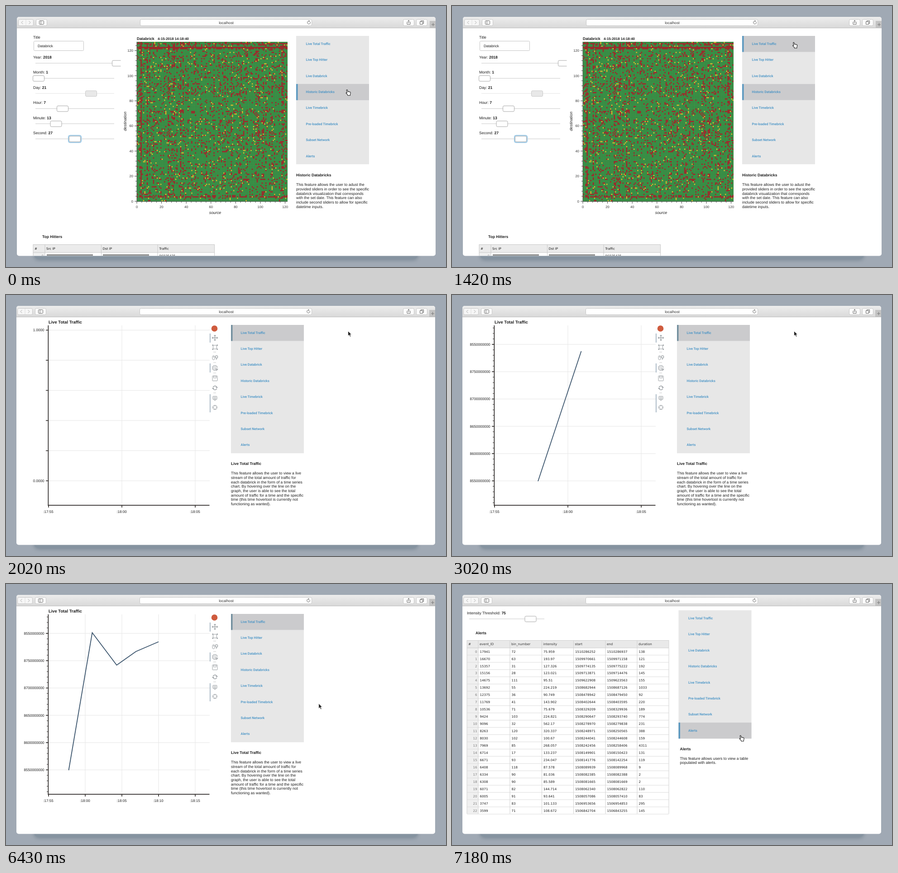
These frames come from a looping animation (972x576 px, 9.05 s). An HTML page with a canvas:

```html
<!DOCTYPE html>
<html lang="en">
<head>
<meta charset="utf-8">
<title>Traffic dashboard</title>
<style>
html, body { margin: 0; width: 100%; height: 100%; overflow: hidden; background: #a0a9b4; }
canvas, svg { position: absolute; left: 0; top: 0; width: 972px; height: 576px; }
text { white-space: pre; text-rendering: geometricPrecision; }
</style>
</head>
<body>
<canvas id="stage" width="972" height="576"></canvas>
<svg id="ink" viewBox="0 0 972 576">
  <clipPath id="page"><rect x="23" y="24" width="926" height="527"/></clipPath>
  <g id="words" clip-path="url(#page)"></g>
  <g id="arrow" stroke-linejoin="round">
    <path d="M0 0V11L2.6 8.7L4.5 12.8L6.5 11.9L4.7 7.9H8Z" fill="#222" stroke="#fff" stroke-width=".9"/>
  </g>
  <g id="hand" fill="#fff" stroke="#222" stroke-width="1.1" stroke-linejoin="round">
    <path d="M1.2 1.2C1 .2 3 -.2 3.3 1L4.1 4.6C4.4 3.8 5.7 3.9 6 4.9C6.6 4.2 7.8 4.5 8 5.4C8.8 4.9 10 5.4 10.1 6.6C10.2 8.6 9.8 9.8 9.3 11V13H4V11.7L.6 8.3C-.6 6.9 .9 6.1 2.4 7.5Z"/>
  </g>
</svg>
<script>
const LOOP = 9050;
const ctx = document.getElementById('stage').getContext('2d');
const $ = id => document.getElementById(id);
const SANS = '"Liberation Sans", Arial, sans-serif';
const WIDE = '"DejaVu Sans", Verdana, sans-serif';
const LINK = 'Roboto, sans-serif';
const ITEM = 35.4;
const ITEMS = ['Live Total Traffic', 'Live Top Hitter', 'Live Databrick', 'Historic Databricks',
  'Live Timebrick', 'Pre-loaded Timebrick', 'Subset Network', 'Alerts'];

// Text helpers
function node(name, parent, attrs) {
  const el = document.createElementNS('http://www.w3.org/2000/svg', name);
  for (const k in attrs) el.setAttribute(k, attrs[k]);
  return parent.appendChild(el);
}
const groups = {};
const group = name => groups[name] = node('g', $('words'), {});

function text(g, str, x, y, opt = {}) {
  const el = node('text', g, { x, y, 'font-family': SANS, 'font-size': 8.5, fill: '#1c1c1c', ...opt });
  el.textContent = str;
  return el;
}
const bold = (g, str, x, y, size = 8.5) => text(g, str, x, y, { 'font-size': size, 'font-weight': 'bold' });
const lines = (g, list, x, y) => list.forEach((s, i) => text(g, s, x, y + i * 9.67));
const wide = (g, str, x, y, opt = {}) => text(g, str, x, y, { 'font-family': WIDE, 'font-size': 7.1, ...opt });

function pair(g, label, value, x, y) {
  const el = text(g, label + ' ', x, y);
  node('tspan', el, { 'font-weight': 'bold' }).textContent = value;
}
function links(g, x, y) {
  ITEMS.forEach((s, i) => text(g, s, x + 21.5, y + i * ITEM + 19.7,
    { 'font-family': LINK, 'font-size': 7.4, 'font-weight': 500, fill: '#3f8fc4' }));
}

// Shape helpers
function rect(x, y, w, h, fill) {
  ctx.fillStyle = fill;
  ctx.fillRect(x, y, w, h);
}
function box(x, y, w, h, r, fill, stroke) {
  ctx.beginPath();
  ctx.roundRect(x, y, w, h, r);
  if (fill) { ctx.fillStyle = fill; ctx.fill(); }
  if (stroke) { ctx.strokeStyle = stroke; ctx.stroke(); }
}
function path(points, color, width = 1) {
  ctx.beginPath();
  points.forEach(([x, y]) => ctx.lineTo(x, y));
  ctx.strokeStyle = color;
  ctx.lineWidth = width;
  ctx.stroke();
  ctx.lineWidth = 1;
}
function arc(x, y, r, a, b, color, width = 1) {
  ctx.beginPath();
  ctx.arc(x, y, r, a, b);
  ctx.strokeStyle = color;
  ctx.lineWidth = width;
  ctx.stroke();
  ctx.lineWidth = 1;
}

function browser(dx) {
  rect(0, 0, 972, 576, '#a0a9b4');
  ctx.save();
  ctx.shadowColor = '#7b8996';
  ctx.shadowBlur = 9;
  ctx.shadowOffsetY = 3;
  box(62, 535, 848, 23, 10, '#8593a0');
  ctx.restore();

  const left = 23 + dx;
  box(left, 24, 925, 527.5, 5, '#fff');
  const bar = ctx.createLinearGradient(0, 24, 0, 48);
  bar.addColorStop(0, '#ededed');
  bar.addColorStop(1, '#d9d9d9');
  box(left, 24, 925, 24, [5, 5, 0, 0], bar);
  rect(left, 48, 925, 1, '#bcbcbc');

  const edge = '#c6c6c6', mark = '#6b6b6b', b = 26 + dx * 2;
  box(b - .5, 29.5, 33, 14, 3, '#f6f6f6', edge);
  path([[b + 16, 30], [b + 16, 43]], '#dedede');
  path([[b + 9.5, 33], [b + 6, 36.5], [b + 9.5, 40]], '#ababab');
  path([[b + 22.5, 33], [b + 26, 36.5], [b + 22.5, 40]], '#ababab');
  box(b + 38.5, 29.5, 24, 14, 3, '#fbfbfb', edge);
  box(b + 45.5, 32.5, 10, 8, 1, null, mark);
  path([[b + 49, 33], [b + 49, 40]], mark);
  box(295 + dx + .5, 29.5, 380 - dx, 14, 3, '#fff', edge);
  arc(668 + dx, 36.5, 3.3, -.4, 4.9, mark);
  path([[667.5 + dx, 31.6], [670 + dx, 33.3], [667.5 + dx, 35]], mark);
  box(877.5, 29.5, 24, 14, 3, '#fbfbfb', edge);
  path([[887.5, 35.5], [886, 35.5], [886, 40.5], [893, 40.5], [893, 35.5], [891.5, 35.5]], mark);
  path([[889.5, 38], [889.5, 31.5]], mark);
  path([[887.5, 33.5], [889.5, 31.5], [891.5, 33.5]], mark);
  box(906.5, 29.5, 24, 14, 3, '#fbfbfb', edge);
  box(916.5, 32.5, 6, 6, 0, null, mark);
  box(914.5, 34.5, 6, 6, 0, '#fbfbfb', mark);
  rect(935 + dx, 33, 13, 15, '#c3c3c3');
  path([[939 + dx, 41], [946 + dx, 41]], '#777');
  path([[942.5 + dx, 37.5], [942.5 + dx, 44.5]], '#777');
}

function menu(x, y, lit, edge = '#5b98bf', fill = '#cbcbcd') {
  rect(x, y, 161, ITEM * 8, '#e7e7e7');
  lit.forEach(i => {
    if (i < 0) return;
    rect(x, y + i * ITEM, 161, ITEM, fill);
    rect(x, y + i * ITEM, 3.5, ITEM, edge);
  });
}
function slider(x0, x1, y, handle, faded) {
  rect(x0, y - .5, x1 - x0, 1, faded ? '#e4e4e4' : '#c9c9c9');
  box(handle + .5, y - 6, 25, 12.5, 2.5, faded ? '#e8e8e8' : '#fff', faded ? '#c9c9c9' : '#a8a8a8');
}

// Heatmap
const CW = 333 / 122, RH = 352 / 127;
function makeHeat() {
  let seed = 20418;
  const rnd = () => (seed = (seed * 16807) % 2147483647) / 2147483647;
  const c = document.createElement('canvas');
  c.width = 333; c.height = 352;
  const h = c.getContext('2d');
  const cols = Array.from({ length: 122 }, () => rnd() ** 3 * .24);
  const rows = Array.from({ length: 127 }, () => rnd() ** 3 * .2);
  [8, 10, 25, 35, 62, 66, 71, 73, 86, 104, 117].forEach(i => cols[i] += .2);
  [37, 102].forEach(i => cols[i] += .32);
  cols[3] = .62;
  rows[125] = .5; rows[122] = 1; rows[121] = .55; rows[3] = .5;
  h.fillStyle = '#42a04f';
  h.fillRect(0, 0, 333, 352);
  for (let y = 0; y < 127; y++) for (let x = 0; x < 122; x++) {
    const p = y < 2 ? .04 : .035 + cols[x] + rows[y], r = rnd();
    if (r < p) h.fillStyle = '#c4202f';
    else if (r > .966) h.fillStyle = '#f0cf35';
    else continue;
    h.fillRect(x * CW, 352 - (y + 1) * RH, CW, RH);
  }
  h.fillStyle = 'rgba(25,70,35,.42)';
  for (let x = 0; x <= 122; x++) h.fillRect(x * CW - .35, 0, .7, 352);
  for (let y = 0; y <= 127; y++) h.fillRect(0, 352 - y * RH - .35, 333, .7);
  return c;
}
const heat = makeHeat();

const KNOBS = [['Year:', '2018', 234], ['Month:', '1', 59], ['Day:', '21', 175],
  ['Hour:', '7', 112], ['Minute:', '13', 97.5], ['Second:', '27', 139]];

function drawBricks(hover) {
  box(61.5, 77.5, 110, 21, 2, '#fff', '#c4c4c4');
  KNOBS.forEach(([, , x], i) => {
    const y = 126.2 + i * 33.4;
    ctx.save();
    ctx.beginPath();
    ctx.rect(50, y - 12, 203.5, 24);
    ctx.clip();
    if (i === 5) box(x - 1.5, y - 8, 29, 16.5, 4, '#b9dcf3', '#7fbbe3');
    slider(65, 239, y, x, i === 2);
    ctx.restore();
  });
  ctx.drawImage(heat, 289, 79);
  for (let v = 0; v <= 124; v += 4) {
    const big = v % 20 === 0 ? 5 : 3;
    rect(289 - big, 430.5 - v * RH, big, 1, '#444');
    if (v <= 120) rect(288.5 + v * CW, 431, 1, big, '#444');
  }
  rect(288.5, 79, 1, 353, '#555');
  rect(288.5, 431, 333.5, 1, '#555');
  menu(641, 66, [3, hover]);

  rect(60, 526, 401, 18, '#ebebeb');
  rect(60, 544, 26, 7, '#f0f0f0');
  rect(60, 526, 401, 1, '#c8c8c8');
  rect(60, 543.5, 401, 1, '#c8c8c8');
  [60, 86, 210.5, 335, 460.5].forEach(x => rect(x - .5, 526, 1, 25, '#c8c8c8'));
  rect(90, 548, 102, 3, '#8d8d8d');
  rect(214, 548, 102, 3, '#8d8d8d');
}

function writeBricks() {
  const g = group('bricks');
  text(g, 'Title', 60, 72);
  text(g, 'Databrick', 70, 91.3, { 'font-size': 8 });
  KNOBS.forEach(([a, b], i) => pair(g, a, b, 60, 116 + i * 33.4));
  bold(g, 'Databrick', 289, 75);
  bold(g, '4-15-2018 14:18:40', 335, 75, 7.8);
  const axis = { 'font-size': 7.6, 'text-anchor': 'middle', fill: '#333' };
  for (let v = 0; v <= 120; v += 20) {
    text(g, v, 289 + v * CW, 445.5, axis);
    text(g, v, 281, 433.7 - v * RH, { ...axis, 'text-anchor': 'end' });
  }
  const slant = { 'font-size': 8.8, 'font-style': 'italic', 'text-anchor': 'middle' };
  text(g, 'source', 462, 459, slant);
  text(g, 'destination', 0, 0, { ...slant, transform: 'translate(265.5 254.5) rotate(-90)' });
  links(g, 641, 66);
  bold(g, 'Historic Databricks', 641, 376);
  lines(g, ['This feature allows the user to adust the', 'provided sliders in order to see the specific',
    'databrick visualization that corresponds', 'with the set date. This feature can also',
    'include second sliders to allow for specific', 'datetime inputs.'], 641, 397.3);
  bold(g, 'Top Hitters', 80, 512);
  [['#', 63], ['Src IP', 89], ['Dst IP', 213.5], ['Traffic', 338.5]].forEach(([s, x]) => wide(g, s, x, 537.5));
  wide(g, '0', 83, 553.8, { 'text-anchor': 'end', fill: '#888' });
  wide(g, '96935435', 338.5, 553.8);
}

// Line chart: pixels per five seconds, then the data points
const STAGES = [
  { at: 2020, step: 162, pts: [] },
  { at: 3020, step: 162, pts: [[190, 411], [285.5, 124]] },
  { at: 4020, step: 130, pts: [[167, 411], [250, 108], [325, 181]] },
  { at: 5020, step: 108, pts: [[148, 411], [225, 107.5], [284.5, 181], [351, 148]] },
  { at: 6020, step: 81, pts: [[138.5, 411], [190.5, 107.5], [244.5, 179], [287, 149], [337, 127.5]] }
];
const ROWS = ['8550000000', '8750000000', '8700000000', '8650000000', '8600000000', '8550000000'];
const tickY = (i, empty) => empty ? 77.5 + i * 66.5 : 109 + i * 60.25;

function tools() {
  const c = '#9a9fa3', x = 461.5;
  [[85, 20], [151, 20], [219, 40]].forEach(([y, h]) => rect(450, y, 1.7, h, '#9fb0bf'));
  [126, 149, 172, 216].forEach(y => rect(458, y - .5, 6, 1, '#ccc'));
  ctx.beginPath();
  ctx.arc(460.5, 74, 6.8, 0, 7);
  ctx.fillStyle = '#cf5b3e';
  ctx.fill();
  path([[x - 5.5, 94.5], [x + 5.5, 94.5]], c, 1.3);
  path([[x, 89], [x, 100]], c, 1.3);
  for (let k = 0; k < 4; k++) {
    const a = k * Math.PI / 2, p = (r, d) => [x + r * Math.cos(a) - d * Math.sin(a), 94.5 + r * Math.sin(a) + d * Math.cos(a)];
    path([p(4, -2), p(6, 0), p(4, 2)], c, 1.2);
    rect(x + (k & 1 ? 4 : -6), 115 + (k & 2 ? 3.5 : -5.5), 2.5, 2.5, c);
  }
  box(x - 4, 111, 8, 8, 0, null, c);
  box(x - 5.5, 134, 5, 9, 2.5, null, c);
  path([[x - 3, 135], [x - 3, 138]], c);
  arc(x + 3.5, 136.5, 2.7, 0, 7, c, 1.2);
  path([[x + 4.5, 139], [x + 2.5, 143]], c, 1.2);
  arc(x, 161, 5.5, .9, 6.2, c, 1.2);
  arc(x, 161, 2.6, 0, 7, c);
  path([[x + 1, 163.5], [x + 6, 163.5], [x + 3.5, 167]], c, 1.3);
  box(x - 5.5, 178.5, 11, 11, 1, null, c);
  box(x - 3, 179, 6, 4, 0, null, c);
  arc(x, 205, 4.3, 3.4, 5.9, c, 1.5);
  arc(x, 205, 4.3, .3, 2.8, c, 1.5);
  path([[x + 2, 204], [x + 6, 204]], c, 1.8);
  path([[x - 6, 206], [x - 2, 206]], c, 1.8);
  box(x - 4.5, 223.5, 9, 7, 1, null, c);
  path([[x - 3, 226], [x + 3, 226]], c);
  path([[x - 3, 228.3], [x + 3, 228.3]], c);
  path([[x - 2, 231], [x, 233.5], [x + 2, 231]], c);
  arc(x, 248, 4.6, 0, 7, c, 1.2);
  [[0, -1], [0, 1], [1, 0], [-1, 0]].forEach(([a, b]) =>
    path([[x + a * 5, 248 + b * 5], [x + a * 2, 248 + b * 2]], c));
}

function drawChart(s, hover) {
  const ink = '#2e2a28', empty = !s.pts.length;
  for (let i = 0; i < 6; i++) {
    const y = tickY(i, empty);
    rect(94, y - .5, 356, 1, '#e6e6e6');
    rect(88, y - .7, 5, 1.5, ink);
  }
  if (!empty) for (let y = 72.8; y < 464; y += 12.05) rect(90, y - .5, 3, 1, ink);
  for (let x = 94; x < 450; x += s.step) {
    if (x > 94) rect(x - .5, 67, 1, 396, '#e6e6e6');
    rect(x - .8, 464, 1.6, 5, ink);
  }
  rect(92.5, 67, 1.7, 398, ink);
  rect(92.5, 463.2, 357, 1.7, ink);
  if (!empty) path(s.pts, '#3d566e', 1.8);
  tools();
  menu(497, 66, [0, hover], '#73909f');
}

function writeChart() {
  const g = group('live');
  bold(g, 'Live Total Traffic', 94, 63, 9.4);
  links(g, 497, 65.8);
  bold(g, 'Live Total Traffic', 497, 375);
  lines(g, ['This feature allows the user to view a live', 'stream of the total amount of traffic for',
    'each databrick in the form of a time series', 'chart. By hovering over the line on the',
    'graph, the user is able to see the total', 'amount of traffic for a time and the specific',
    'time (this time hovertool is currently not', 'functioning as wanted).'], 497, 396.4);
  STAGES.forEach((s, n) => {
    const t = group('axis' + n), empty = !s.pts.length;
    const end = { 'font-size': 8.1, 'text-anchor': 'end' };
    if (empty) [['1.0000', 0], ['0.0000', 5]].forEach(([v, i]) => text(t, v, 84.5, tickY(i, true) + 2.9, end));
    else ROWS.forEach((v, i) => text(t, v, 84.5, tickY(i) + 2.9, end));
    ['17:55', '18:00', '18:05', '18:10', '18:15'].forEach((v, i) => {
      const x = 94 + i * s.step;
      if (x < 450) text(t, ':' + v, x - .5, 480.5, { 'font-size': 8, 'text-anchor': 'middle' });
    });
  });
}

// Alerts page
const COLS = [33, 58, 128, 198.5, 268.5, 339, 409, 479];
const ROW = 15.95;
const ALERTS = `17941 72 75.959 1510286252 1510286937 138
16670 63 193.97 1509970661 1509971158 121
15357 31 127.326 1509774135 1509775222 192
15156 28 123.021 1509713871 1509714476 145
14675 111 95.51 1509622908 1509623563 155
13692 55 224.219 1508682944 1508687126 1033
12375 36 90.749 1508478942 1508479450 92
11769 41 143.902 1508402644 1508403595 220
10536 71 75.679 1508329209 1508329936 189
9424 103 224.821 1508290647 1508293740 774
9096 32 562.17 1508278970 1508279838 231
8263 120 320.337 1508248971 1508250565 388
8030 102 100.67 1508244041 1508244608 159
7969 85 268.057 1508242456 1508258406 4311
6714 17 133.237 1508149901 1508150423 131
6671 93 234.047 1508141776 1508142254 119
6408 118 87.578 1508089939 1508089968 9
6334 90 81.036 1508082385 1508082388 2
6308 90 85.589 1508081665 1508081669 2
6071 82 144.714 1508062340 1508062822 110
6005 91 93.641 1508057086 1508057410 83
3747 83 101.133 1506953656 1506954853 295
3599 71 108.672 1506842704 1506843255 145`.split('\n').map(r => r.split(' '));

function drawAlerts() {
  slider(38, 204, 77, 160.5);
  rect(33, 124, 446, 16.5, '#e9e9e9');
  rect(33, 140.5, 25, ROW * 23, '#f0f0f0');
  rect(33, 124, 446, 1, '#cfcfcf');
  for (let i = 0; i < 24; i++) rect(33, 140.5 + i * ROW, 446, 1, i ? '#dcdcdc' : '#c8c8c8');
  COLS.forEach(x => rect(x - .5, 124, 1, 383, '#d2d2d2'));
  menu(500.5, 58, [7]);
}
function writeAlerts() {
  const g = group('alerts');
  pair(g, 'Intensity Threshold:', '75', 33, 67.3);
  bold(g, 'Alerts', 52, 110.7);
  ['#', 'event_ID', 'bin_number', 'intensity', 'start', 'end', 'duration'].forEach((s, i) =>
    wide(g, s, COLS[i] + 3, 135, { fill: '#333' }));
  ALERTS.forEach((row, n) => {
    const y = 151.6 + n * ROW;
    wide(g, n, 55.5, y, { 'text-anchor': 'end', fill: '#777' });
    row.forEach((s, i) => wide(g, s, COLS[i + 1] + 3.5, y));
  });
  links(g, 500.5, 58.3);
  bold(g, 'Alerts', 503.5, 367);
  lines(g, ['This feature allows users to view a table', 'populated with alerts.'], 503.5, 387.8);
}

// Timeline
const clamp = v => Math.max(0, Math.min(1, v));
const ease = p => p * p * (3 - 2 * p);
const itemAt = (y, top) => Math.min(7, Math.floor((y - top) / ITEM));

function pointer(t) {
  if (t < 2020) {
    const p = ease(clamp((Math.floor((t - 1000) / 70) + 1) / 7));
    return { x: 751 + 1.5 * p, y: 184.5 - 104.5 * p, hand: true };
  }
  if (t < 6020) return { x: 755.5, y: 79.5 };
  const tick = 6640 - Math.ceil((6640 - t) / 70) * 70;
  const p = clamp((tick - 6020) / 620);
  const x = 755.5 - 120.5 * p ** 1.5, y = 79.5 + 254.5 * p ** .78;
  return { x, y, hand: x < 658 };
}

function show(names) {
  for (const k in groups) groups[k].style.display = names.includes(k) ? '' : 'none';
}
function draw(t) {
  const c = pointer(t);
  browser(t < 2020 ? 1 : 0);
  if (t < 2020) {
    drawBricks(itemAt(c.y + 3, 66));
    show(['bar', 'bricks']);
  } else if (t < 6910) {
    const n = STAGES.findLastIndex(s => t >= s.at);
    drawChart(STAGES[n], c.hand ? itemAt(c.y, 66) : -1);
    show(['bar', 'live', 'axis' + n]);
  } else {
    drawAlerts();
    show(['bar', 'alerts']);
  }
  $('arrow').style.display = c.hand ? 'none' : '';
  $('hand').style.display = c.hand ? '' : 'none';
  $(c.hand ? 'hand' : 'arrow').setAttribute('transform', `translate(${c.x} ${c.y})`);
}

text(group('bar'), 'localhost', 486.5, 39.5, { 'font-size': 8.3, 'text-anchor': 'middle', fill: '#333' });
writeBricks();
writeChart();
writeAlerts();

const start = performance.now();
function frame() {
  draw((performance.now() - start) % LOOP);
  requestAnimationFrame(frame);
}
frame();
</script>
</body>
</html>
```
